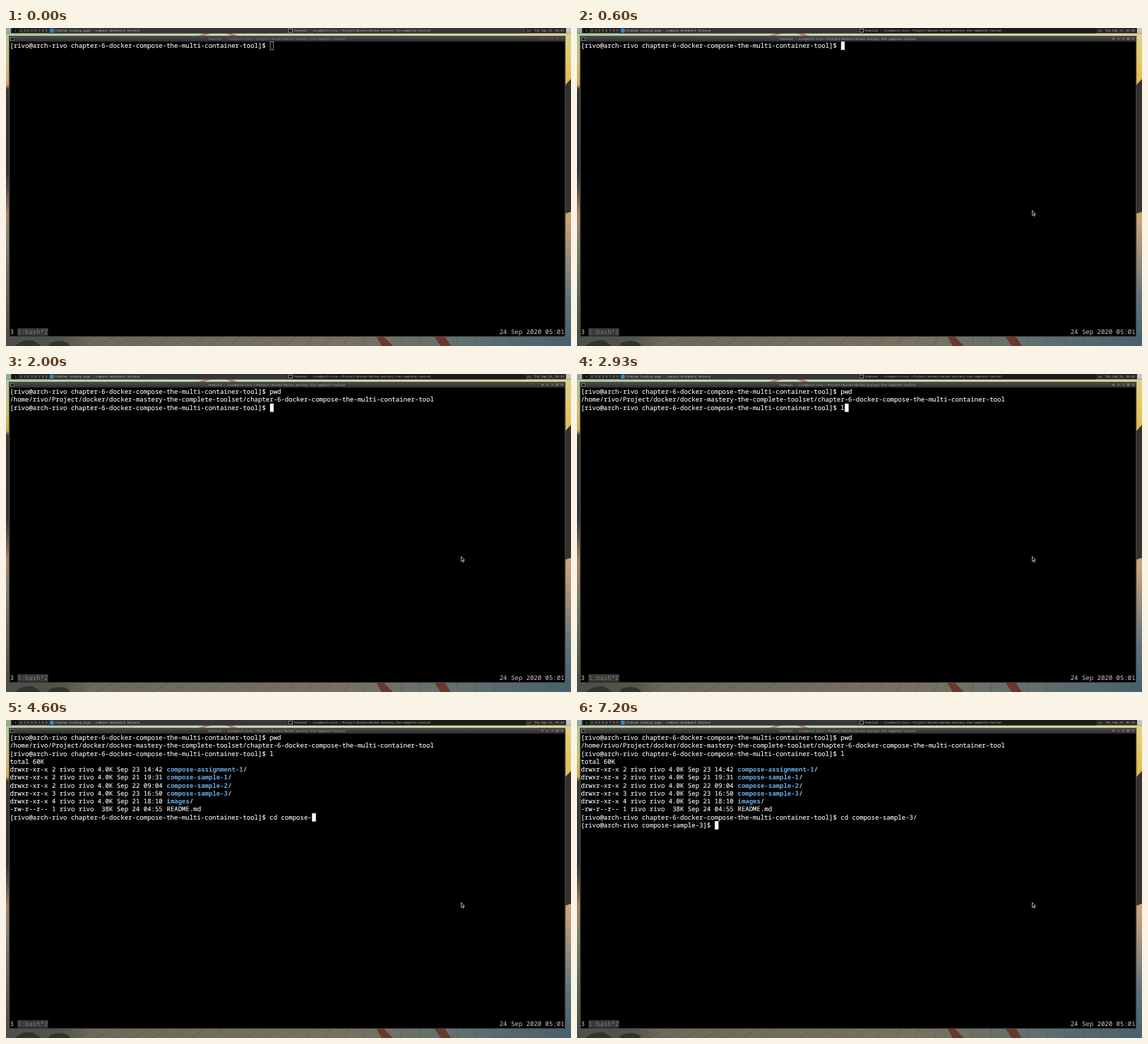
An HTML page that plays this animation: 800 by 450 pixels, repeating every 8000 ms.

```html
<!DOCTYPE html>
<html lang="en">
<head>
<meta charset="utf-8">
<title>Terminal session</title>
<style>
html, body { margin: 0; width: 100%; height: 100%; overflow: hidden; background: #000; }
svg { display: block; width: 800px; height: 450px; }
text { font-family: "Noto Sans Mono", monospace; white-space: pre; text-rendering: geometricPrecision; }
.small { font-size: 4.17px; }
#screen, #status { font-size: 9.028px; }
#screen { fill: #fafafa; stroke: #fafafa; stroke-width: .12; }
#screen .dir { font-weight: bold; fill: #6cabdf; stroke: none; }
</style>
</head>
<body>
<svg viewBox="0 0 800 450">
  <defs>
    <linearGradient id="top">
      <stop offset="0" stop-color="#b0c6a0"/><stop offset=".3" stop-color="#c3d2aa"/>
      <stop offset=".6" stop-color="#cdd4a6"/><stop offset="1" stop-color="#dbd292"/>
    </linearGradient>
    <linearGradient id="left" x2="0" y2="1">
      <stop offset="0" stop-color="#b0c6a0"/><stop offset=".1" stop-color="#c9bd75"/>
      <stop offset=".165" stop-color="#d2a849"/><stop offset=".18" stop-color="#3a3631"/>
      <stop offset=".44" stop-color="#34312e"/><stop offset=".5" stop-color="#55504a"/>
      <stop offset=".58" stop-color="#a9825c"/><stop offset=".66" stop-color="#85806f"/>
      <stop offset=".9" stop-color="#57574d"/><stop offset="1" stop-color="#45483f"/>
    </linearGradient>
    <linearGradient id="right" x2="0" y2="1">
      <stop offset="0" stop-color="#dbd292"/><stop offset=".08" stop-color="#e6ca66"/>
      <stop offset=".17" stop-color="#e4b750"/><stop offset=".6" stop-color="#c9a27a"/>
      <stop offset=".7" stop-color="#a08f7d"/><stop offset=".85" stop-color="#5f737e"/>
      <stop offset="1" stop-color="#44606f"/>
    </linearGradient>
    <linearGradient id="floor">
      <stop offset="0" stop-color="#4c5048"/><stop offset=".1" stop-color="#52534a"/>
      <stop offset=".15" stop-color="#6d6a59"/><stop offset=".6" stop-color="#77715f"/>
      <stop offset=".8" stop-color="#62706f"/><stop offset="1" stop-color="#48606d"/>
    </linearGradient>
    <linearGradient id="bar" x2="0" y2="1">
      <stop offset="0" stop-color="#4b4b4b"/><stop offset="1" stop-color="#2f2f2f"/>
    </linearGradient>
  </defs>

  <g id="wallpaper">
    <rect width="800" height="20" fill="url(#top)"/>
    <rect y="7" width="8" height="443" fill="url(#left)"/>
    <rect x="788" y="7" width="12" height="443" fill="url(#right)"/>
    <path d="M788 85l12-13v188l-12 4z" fill="#34322f"/>
    <rect y="434" width="800" height="16" fill="url(#floor)"/>
    <path d="M283 7h9l-14 5h-9zM310 7h9l11 5h-9z" fill="#b58468"/>
    <path d="M12 450q12-10 26-8l12 8zM62 446q14-6 26 0l3 4H60z" fill="#30342e"/>
    <path id="planks" stroke="#4c4c44" stroke-width=".8" opacity=".6"/>
    <path d="M524 436h10l14 14h-16zM606 436h15l9 14h-14z" fill="#6b372b"/>
  </g>

  <g id="panel" class="small" fill="#b9b9b9">
    <rect width="800" height="7.5" fill="#292929"/>
    <rect x="61" width="337" height="7.5" fill="#373737"/>
    <rect id="button" x="398.5" width="337" height="7.5"/>
    <rect width="7" height="7.5" fill="#93aa9c"/>
    <rect x="9" y=".5" width="8" height="6.5" fill="#111"/>
    <text x="12" y="5.2">1</text>
    <g id="tags"></g>
    <circle cx="65" cy="3.7" r="3" fill="#2f88c8"/>
    <text x="69.5" y="5.2">Problem loading page - Lumbarn Workbench Release</text>
    <rect x="400" y="1.2" width="5.4" height="4.8" fill="#191919" stroke="#b4b4b4" stroke-width=".7"/>
    <text id="task" x="407" y="5.2"></text>
    <text x="738" y="5.2">us</text>
    <text x="748" y="5.2">Thu Sep 24, 05:01</text>
    <rect x="793" width="7" height="7.5" fill="#c4c8bd"/>
  </g>

  <g id="window">
    <rect x="4" y="11" width="788.3" height="426" fill="#4e4e4e"/>
    <rect x="4.5" y="11.5" width="787.3" height="7.8" fill="url(#bar)"/>
    <rect x="5.2" y="19.2" width="786" height="417" fill="#000"/>
    <rect x="6.6" y="13.3" width="5" height="4.4" fill="#191919" stroke="#9a9a9a" stroke-width=".6"/>
    <text id="title" class="small" x="286" y="17"></text>
    <path id="buttons" fill="none" stroke-width=".7"
      d="M758 15.3h3M759.5 13.8v3M765 14.4l1.6 2l1.6-2M772 16.4l1.6-2l1.6 2M779.3 14.1h2.4v2.4h-2.4zM786 13.9l2.8 2.8m0-2.8l-2.8 2.8"/>
  </g>

  <g id="screen"></g>
  <rect id="caret" height="11" stroke-width=".7"/>
  <g id="status">
    <rect x="16.2" y="424.7" width="43.4" height="11" fill="#393737"/>
    <text x="5.4" y="433.2" fill="#c8c8c8">3</text>
    <text x="16.2" y="433.2" fill="#827b78">1:bash*Z</text>
    <text x="698.7" y="433.2" fill="#c8c8c8">24 Sep 2020 05:01</text>
  </g>
  <path id="mouse" d="M0 0v7l1.6-1.4l1.1 2.5l1.1-.5l-1.1-2.4h2z" fill="#080808" stroke="#eee" stroke-width=".7"/>
</svg>
<script>
const LOOP = 8000, COL = 65 / 12, ROW = 11.25, LEFT = 5.4, TOP = 19.5;
const $ = id => document.getElementById(id);

const user = "rivo", host = "arch-rivo";
const chapter = "chapter-6-docker-compose-the-multi-container-tool";
const project = "Project/docker/docker-mastery-the-complete-toolset";
const prompt = dir => `[${user}@${host} ${dir}]$ `;

const entry = (mode, links, size, date, name, dir) => ({
  text: `${mode} ${links} ${user} ${user} ${size} Sep ${date} `, name, dir
});
const folder = (links, date, name) => entry("drwxr-xr-x", links, "4.0K", date, name, true);
const listing = [
  { text: "total 60K" },
  folder(2, "23 14:42", "compose-assignment-1"),
  folder(2, "21 19:31", "compose-sample-1"),
  folder(2, "22 09:04", "compose-sample-2"),
  folder(3, "23 16:50", "compose-sample-3"),
  folder(4, "21 18:10", "images"),
  entry("-rw-r--r--", 1, " 38K", "24 04:55", "README.md", false)
];

// Each command: when the input line changes, when it runs, what it prints.
const session = [
  { dir: chapter, keys: [[1330, "p"], [1470, "pw"], [1600, "pwd"]], run: 2000,
    out: [{ text: `/home/${user}/${project}/${chapter}` }] },
  { dir: chapter, keys: [[2930, "l"]], run: 3330, out: listing },
  { dir: chapter, run: 7000, out: [],
    keys: [[3670, "c"], [3870, "cd"], [4000, "cd "], [4130, "cd c"], [4400, "cd compose-"],
           [5400, "cd compose-s"], [5600, "cd compose-sample-"],
           [6070, "cd compose-sample-3"], [6270, "cd compose-sample-3/"]] },
  { dir: "compose-sample-3", keys: [], run: Infinity, out: [] }
];

function linesAt(t) {
  const lines = [];
  for (const cmd of session) {
    let typed = "";
    for (const [at, text] of cmd.keys) if (t >= at) typed = text;
    lines.push({ text: prompt(cmd.dir) + typed });
    if (t < cmd.run) break;
    lines.push(...cmd.out);
  }
  return lines;
}

const textAt = (x, y, text, cls = "") => `<text class="${cls}" x="${x}" y="${y}">${text}</text>`;

function lineMarkup(line, row) {
  const y = TOP + row * ROW + 8.7;
  const x = LEFT + line.text.length * COL;
  let html = textAt(LEFT, y, line.text);
  if (line.dir) html += textAt(x, y, line.name, "dir") + textAt(x + line.name.length * COL, y, "/");
  else if (line.name) html += textAt(x, y, line.name);
  return html;
}

let shown = "";
function drawScreen(t) {
  const lines = linesAt(t);
  const html = lines.map(lineMarkup).join("");
  if (html === shown) return;
  shown = $("screen").innerHTML = html;
  const last = lines.length - 1;
  $("caret").setAttribute("x", LEFT + lines[last].text.length * COL + 0.4);
  $("caret").setAttribute("y", TOP + last * ROW + 0.2);
}

function drawFocus(t) {
  const active = t >= 200;
  $("caret").setAttribute("fill", active ? "#fff" : "none");
  $("caret").setAttribute("stroke", active ? "#fff" : "#c4c4c4");
  $("button").setAttribute("fill", active ? "#1c1c1c" : "#373737");
  $("title").setAttribute("fill", active ? "#b0b0b0" : "#8c8c8c");
  $("buttons").setAttribute("stroke", active ? "#a8a8a8" : "#5a5a5a");
}

function drawMouse(t) {
  const p = Math.min(1, Math.max(0, (t - 70) / 460));
  const rest = (1 - p) ** 3;
  $("mouse").setAttribute("transform", `translate(${644.6 + 158 * rest} ${258.3 + 140 * rest})`);
}

function setup() {
  $("title").textContent = $("task").textContent = `Terminal - ${user}@${host}:~/${project}`;
  $("caret").setAttribute("width", COL - 0.8);
  let tags = "", planks = "";
  for (let n = 2; n < 10; n++) tags += textAt(20 + (n - 2) * 5.15, 5.2, n);
  for (let x = 100; x < 800; x += 27) planks += `M${x} 450l${(400 - x) * 0.06 + 12}-14`;
  $("tags").innerHTML = tags;
  $("planks").setAttribute("d", planks);
}

function frame() {
  const t = performance.now() % LOOP;
  drawScreen(t);
  drawFocus(t);
  drawMouse(t);
  requestAnimationFrame(frame);
}

setup();
frame();
</script>
</body>
</html>
```
